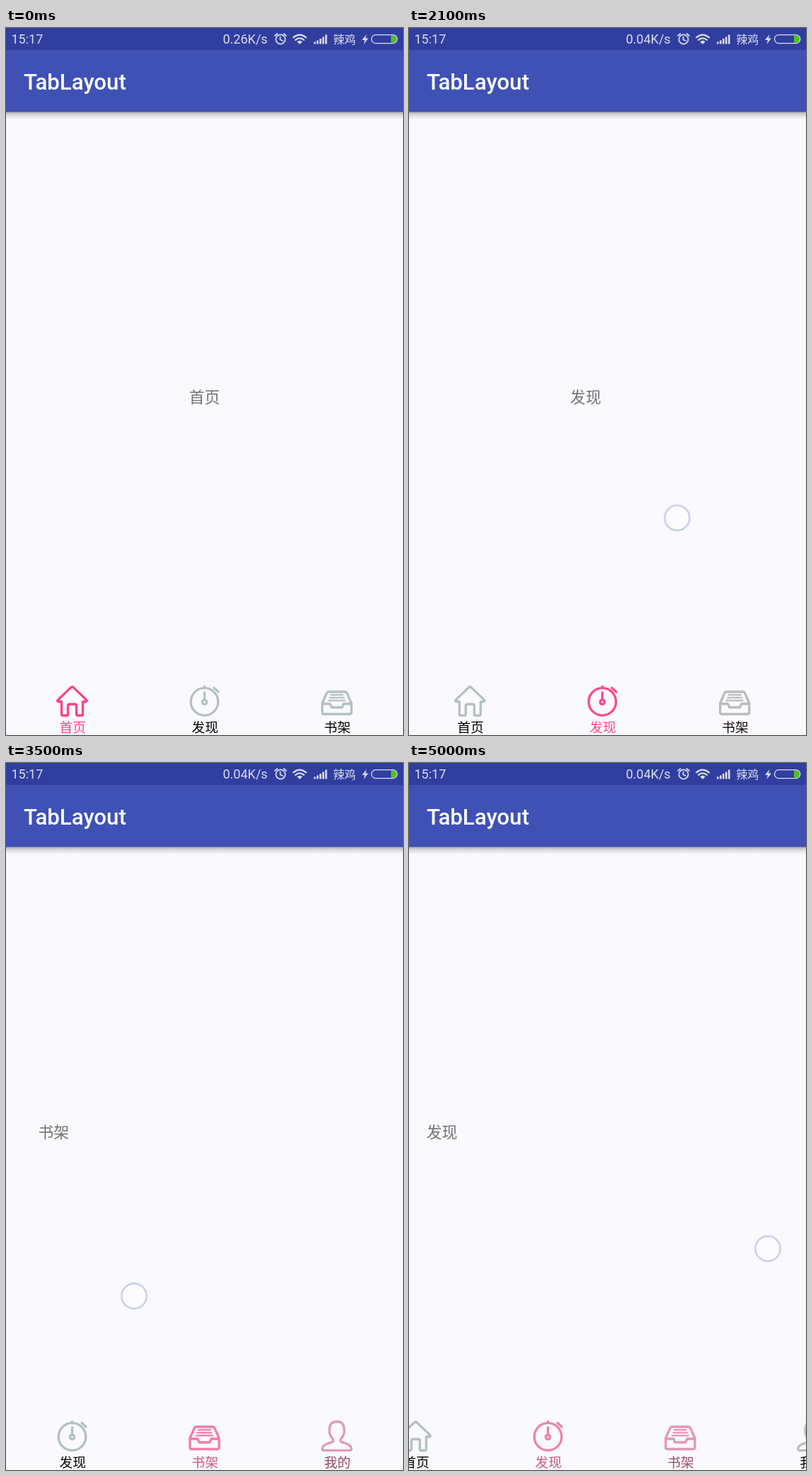
Write an HTML page that moves like this. It is 561 px wide and 998 px high and loops after 5100 ms.

```html
<!DOCTYPE html>
<html lang="zh">
<head>
<meta charset="utf-8">
<title>TabLayout</title>
<style>
  html, body { margin: 0; width: 100%; height: 100%; overflow: hidden; background: #faf9fd; }
  svg { display: block; width: 100vw; height: 100vh; }
  text { font-family: Roboto, "Noto Sans CJK SC", "Noto Sans CJK", sans-serif; }
  .cjk { font-family: "Noto Sans CJK SC", "Noto Sans CJK", sans-serif; text-anchor: middle; }
  .status { font-size: 18px; fill: #d9dcef; }
  .line { fill: none; stroke-linecap: round; stroke-linejoin: round; }
</style>
</head>
<body>
<svg id="stage" viewBox="0 0 561 998">
  <defs>
    <linearGradient id="shade" x1="0" y1="0" x2="0" y2="1">
      <stop offset="0" stop-opacity=".34"/>
      <stop offset=".35" stop-opacity=".15"/>
      <stop offset="1" stop-opacity="0"/>
    </linearGradient>
  </defs>
  <rect width="561" height="998" fill="#faf9fd"/>
  <rect y="118" width="561" height="11" fill="url(#shade)"/>
  <rect y="30" width="561" height="88.5" fill="#3f51b5"/>
  <rect width="561" height="31" fill="#303f9f"/>
  <text x="25" y="87" font-size="31.2" font-weight="500" fill="#fff">TabLayout</text>

  <text class="status" x="7.5" y="22">15:17</text>
  <text class="status" x="306.5" y="22" id="speed"></text>
  <g class="line" stroke="#d9dcef" stroke-width="1.7">
    <circle cx="388" cy="16" r="6.6"/>
    <path d="M387.5 12.5V16.5L391 18M380 11L383.5 8M396 11L392.5 8"/>
    <path d="M406 13.4Q415 5.8 424 13.4M409 16.8Q415 11.8 421 16.8" stroke-width="2.2"/>
  </g>
  <g fill="#d9dcef">
    <path d="M411.3 19.2Q415 16.2 418.7 19.2L415 23Z"/>
    <path d="M435 19.5h2.6V22.5h-2.6zM439 17.5h2.6V22.5h-2.6zM443 15h2.6V22.5h-2.6zM447 12.5h2.6V22.5h-2.6zM451 9.5h2.6V22.5h-2.6z"/>
    <path d="M509.5 9L503 17H507L505.5 23L512 14.5H508Z"/>
    <text class="cjk" x="478.3" y="22" font-size="16">辣鸡</text>
  </g>
  <path d="M544 10.5H548A4.5 4.5 0 0 1 552 15.5A4.5 4.5 0 0 1 548 20.8H544Z" fill="#4fc21c"/>
  <rect x="516.5" y="9.6" width="36.3" height="12" rx="6" fill="none" stroke="#d9dcef" stroke-width="1.3"/>

  <g id="pages" font-size="21.8" fill="#727274"></g>
  <g id="tabs" font-size="18.7"></g>
  <g id="touch">
    <circle r="18" fill="none" stroke="#c3c9ec" stroke-opacity=".4" stroke-width="3"/>
    <circle r="17.3" fill="#fcfcff" stroke="#c0c7e9" stroke-width="1.7"/>
  </g>
</svg>
<script>
const WIDTH = 561, TAB = 187, LOOP = 5100, STEP = 100, SCROLL_LAG = 17;
const PINK = "#ff4081", GRAY = "#b4c0c0";
const $ = id => document.getElementById(id);

const labels = ["首页", "发现", "书架", "我的"];
const icons = [
  `<path d="M-1.5 930.6Q0 929.2 1.5 930.6L20.3 948.6Q21.8 950.8 19 951H15V968.5Q15 970.5 13 970.5H8Q6 970.5 6 968.5V956.5
    Q6 954.5 4 954.5H-4Q-6 954.5 -6 956.5V968.5Q-6 970.5 -8 970.5H-13Q-15 970.5 -15 968.5V951H-19Q-21.8 950.8 -20.3 948.6Z"/>`,
  `<circle cy="951" r="19.3"/><circle cy="951.5" r="3.2"/><path d="M0 938V947.5M0 929.5V931.5M13.5 931.5L19.5 937"/>`,
  `<path d="M-11.5 937H11.5Q13.5 937 14.3 938.8L20.6 953V966Q20.6 968.5 18 968.5H-18Q-20.6 968.5 -20.6 966V953L-14.3 938.8Q-13.5 937 -11.5 937Z
    M-20 954H-9.5L-7.5 959H7.5L9.5 954H20"/><path stroke-width="2.3" d="M-8.5 941.3H8.5M-10 945.3H10M-11.5 949.3H11.5"/>`,
  `<path d="M-5.5 954.5C-10 950 -11 944 -10.4 939.5C-9.8 933 -6 929.6 0 929.6C6 929.6 9.8 933 10.4 939.5C11 944 10 950 5.5 954.5
    Q4.3 957.5 7 958.6C12 960.8 19.5 961.5 20.6 967.5Q20.8 970.4 18 970.4H-18Q-20.8 970.4 -20.6 967.5C-19.5 961.5 -12 960.8 -7 958.6Q-4.3 957.5 -5.5 954.5Z"/>`
];

const linear = u => u;
const smooth = u => u * u * (3 - 2 * u);
const settle = u => 1 - (1 - u) ** 5;

// Pager moves: start, end, from page, to page, easing, finger end x, y and y travel
const moves = [
  [300, 1000, 0, .537, smooth, 73, 593, -20],
  [1050, 1830, .537, 1, settle],
  [2000, 2500, 1, 1.529, smooth, 113, 705, 15],
  [2530, 3030, 1.529, 2, settle],
  [3300, 3500, 2, 2.38, linear, 181, 752.5, 10],
  [3530, 3908, 2.38, 3, settle],
  [3900, 4100, 3, 2.606, linear, 527, 695, -10],
  [4130, 4508, 2.606, 2, settle],
  [4700, 5000, 2, 1.417, linear, 507, 685.5, -10]
];

function pagerAt(t) {
  let page = 0;
  for (const [start, end, from, to, ease] of moves) {
    if (t < start) break;
    page = from + (to - from) * ease(Math.min(1, (t - start) / (end - start)));
  }
  return page;
}

const tabLook = (i, line, ink) => `<g><g class="line" stroke="${line}" stroke-width="3.3">${icons[i]}</g>
  <text class="cjk" x=".7" y="994" fill="${ink}">${labels[i]}</text></g>`;

$("pages").innerHTML = labels.map(s => `<text class="cjk" y="528.8">${s}</text>`).join("");
$("tabs").innerHTML = labels.map((s, i) =>
  `<g>${tabLook(i, GRAY, "#000")}${tabLook(i, PINK, PINK)}</g>`).join("");
const pages = [...$("pages").children], tabs = [...$("tabs").children];

function draw(t) {
  const page = pagerAt(t);
  const scroll = TAB * Math.min(1, Math.max(0, pagerAt(t - SCROLL_LAG) - 1));
  labels.forEach((s, i) => {
    const active = Math.max(0, 1 - Math.abs(page - i));
    pages[i].setAttribute("x", WIDTH / 2 + (i - page) * WIDTH);
    tabs[i].setAttribute("transform", `translate(${(i + .5) * TAB - scroll} 0)`);
    tabs[i].children[0].setAttribute("opacity", 1 - active);
    tabs[i].children[1].setAttribute("opacity", active);
  });

  $("speed").textContent = t < 1500 ? "0.26K/s" : "0.04K/s";

  const drag = moves.find(m => m.length > 5 && t >= m[0] && t <= m[1]);
  $("touch").style.display = drag ? "" : "none";
  if (drag) {
    const [, , from, to, , x, y, rise] = drag;
    const left = (to - page) / (to - from);
    $("touch").setAttribute("transform", `translate(${x + (to - page) * WIDTH} ${y - rise * left})`);
  }
}

const origin = performance.now();
function tick() {
  const t = (performance.now() - origin) % LOOP;
  draw(Math.floor(t / STEP) * STEP);
  requestAnimationFrame(tick);
}
tick();
</script>
</body>
</html>
```
